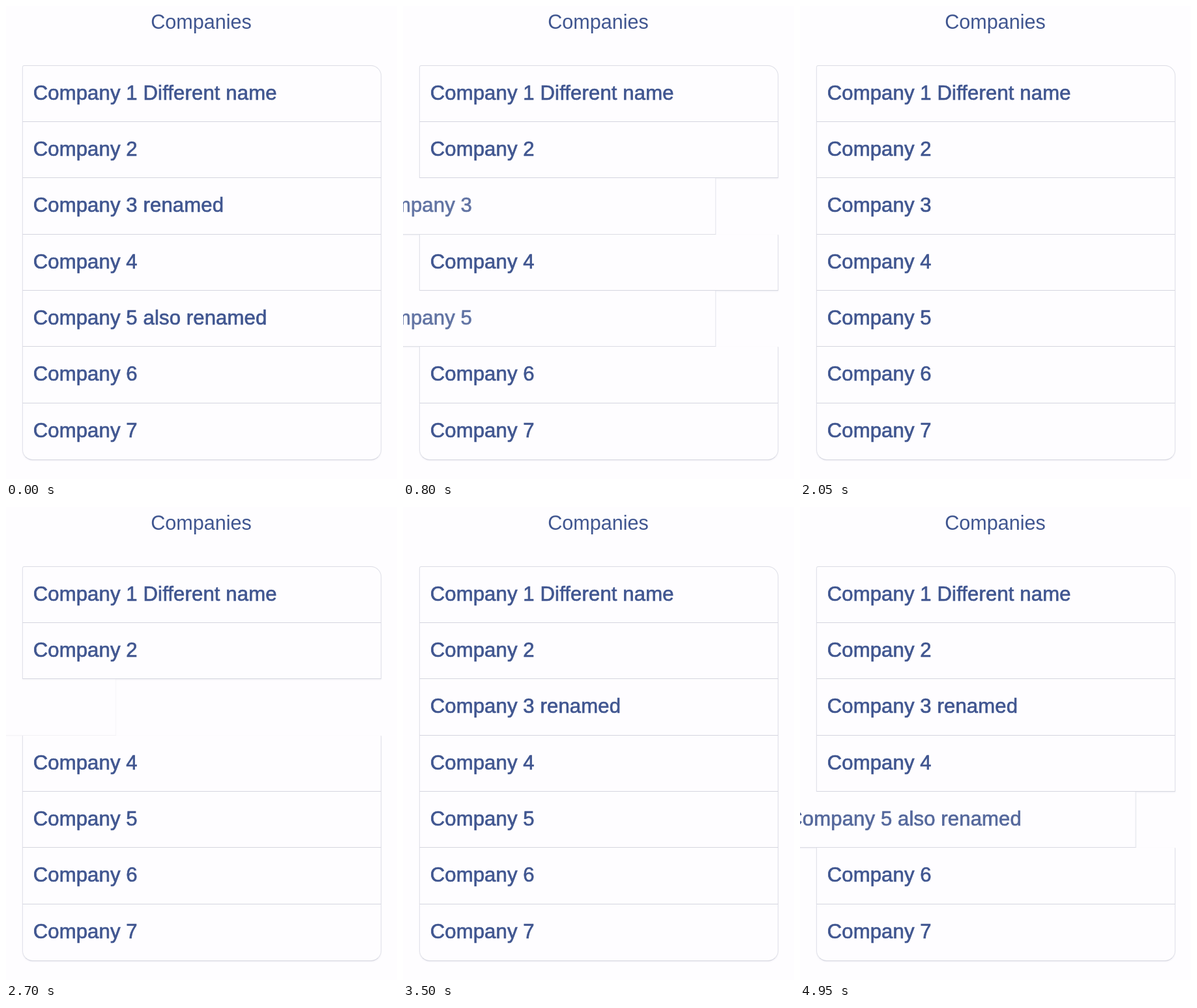
An HTML page that plays this animation: 600x726 px, repeating every 5000 ms.

```html
<!DOCTYPE html>
<html lang="en">
<head>
<meta charset="utf-8">
<title>Companies</title>
<style>
  html, body { margin: 0; width: 100%; height: 100%; overflow: hidden; background: #fefdff; }
  body { position: relative; color: #405690; font-family: "Liberation Sans", Arial, sans-serif; }
  h1 {
    position: absolute; left: 0; top: 6px; width: 599px; margin: 0;
    font-size: 30.6px; line-height: 36px; font-weight: 400; text-align: center;
  }
  ul { list-style: none; margin: 0; padding: 0; }
  li {
    position: absolute; left: 24.5px; width: 551px; height: 86.33px; box-sizing: border-box;
    padding-left: 16.2px; background: #fefdff;
    border: 0 solid #e1e2ea; border-width: 0 1px 1px; border-bottom-color: #d6d7e0;
    box-shadow: 0 1px 2px rgba(60, 70, 120, .08);
    font-size: 31.1px; line-height: 84px; letter-spacing: .12px; white-space: pre;
    -webkit-text-stroke: .7px #405690;
  }
  li:first-child {
    height: 87px; margin-top: -.67px;
    border-top: 1px solid #dcdde5; border-radius: 3px 16px 0 0;
  }
  li:last-child { border-radius: 0 0 16px 16px; height: 87.4px; }
</style>
</head>
<body>
<h1>Companies</h1>
<ul></ul>
<script>
  const LOOP = 5000, STEP = 50, SLIDE = 400;
  const TOP = 91.67, PITCH = 86.33;
  const suffix = { 1: " Different name" };

  // Each change swaps the text and slides the row in from the left.
  const changes = [
    { row: 3, at: 590, text: "" },
    { row: 5, at: 590, text: "" },
    { row: 3, at: 2626, text: " renamed" },
    { row: 5, at: 4707, text: " also renamed" }
  ];

  const list = document.querySelector("ul");
  const rows = {};
  for (let n = 1; n <= 7; n++) {
    const el = document.createElement("li");
    el.style.top = TOP + (n - 1) * PITCH + "px";
    el.textContent = "Company " + n + (suffix[n] || "");
    list.append(el);
    rows[n] = { el };
  }

  for (const n of [3, 5]) {
    const row = rows[n];
    row.changes = changes.filter(c => c.row === n);
    row.slide = row.el.animate(
      [{ transform: "translateX(-100%)", opacity: 0 }, { transform: "none", opacity: 1 }],
      { duration: SLIDE, easing: "ease", fill: "both" }
    );
    row.slide.pause();
  }

  function draw(t) {
    for (const n of [3, 5]) {
      const { el, slide, changes } = rows[n];
      const past = changes.filter(c => c.at <= t);
      const last = past.length ? past[past.length - 1] : changes[changes.length - 1];
      const text = "Company " + n + last.text;
      if (el.textContent !== text) el.textContent = text;
      slide.currentTime = past.length ? Math.min(t - last.at, SLIDE) : SLIDE;
    }
  }

  const start = performance.now();
  function tick() {
    const t = (performance.now() - start) % LOOP;
    draw(Math.floor(t / STEP) * STEP);
    requestAnimationFrame(tick);
  }
  draw(0);
  requestAnimationFrame(tick);
</script>
</body>
</html>
```
